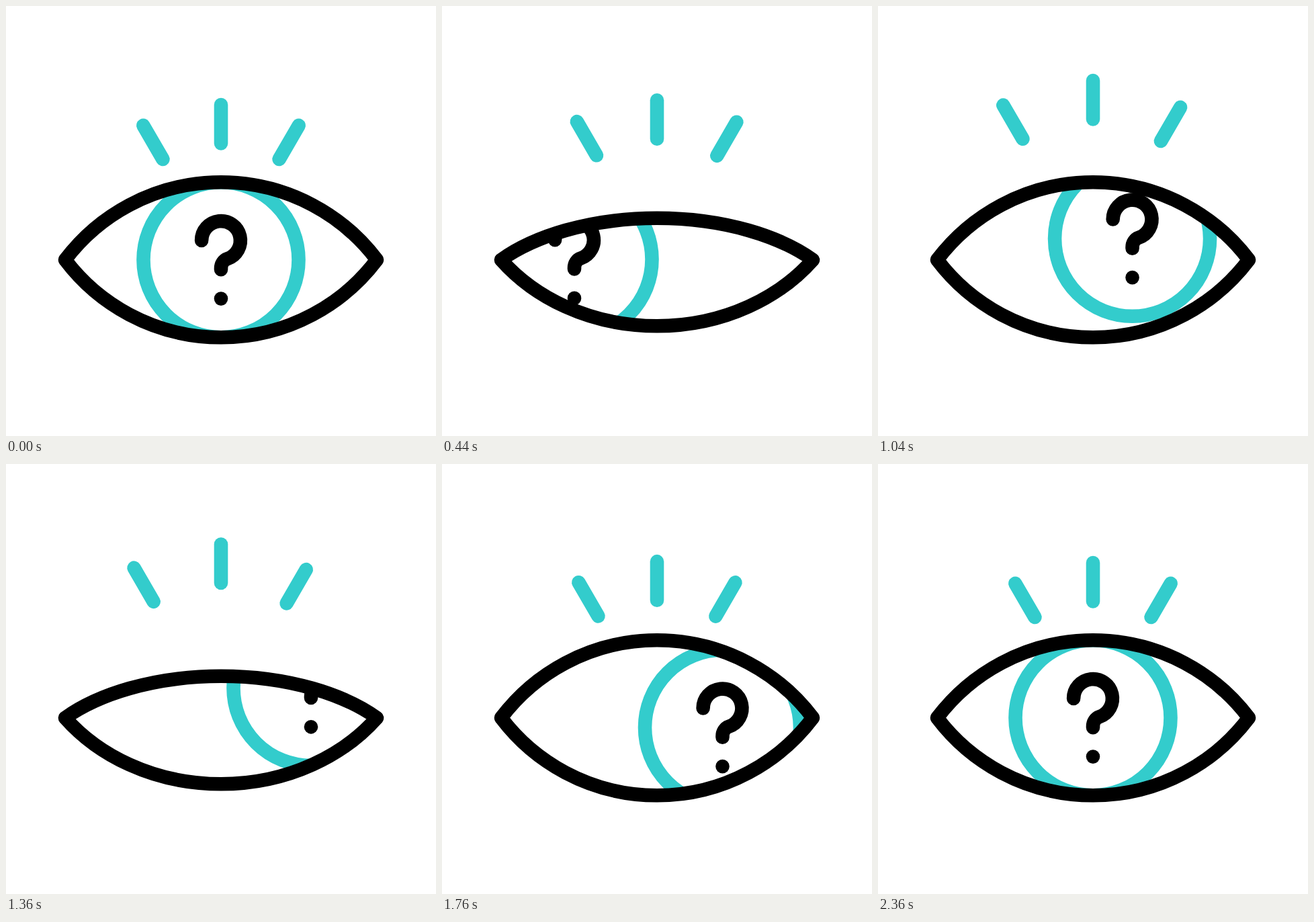
Animation, 640 px wide and 640 px high, one loop 2400 ms. Source, as an HTML page:

```html
<!DOCTYPE html>
<html lang="en">
<head>
<meta charset="utf-8">
<style>
  html, body { margin: 0; height: 100%; overflow: hidden; background: #fff; }
  svg { display: block; width: 100vw; height: 100vh; }
  path, circle { fill: none; stroke: #000; stroke-width: 20.6; stroke-linecap: round; stroke-linejoin: round; }
  .teal { stroke: #3cc; }
  .dot { fill: #000; stroke: none; }
</style>
</head>
<body>
<svg viewBox="0 0 640 640">
  <clipPath id="clip"><path id="opening"/></clipPath>
  <path class="teal" id="left" d="M204.3 177.8L233.4 228"/>
  <path class="teal" id="mid" d="M320 147V204.5"/>
  <path class="teal" id="right" d="M435.7 177.8L406.6 228"/>
  <g clip-path="url(#clip)">
    <g id="iris">
      <circle class="teal" cx="320" cy="377.8" r="115.5"/>
      <path d="M291.1 349A28.9 28.9 0 1 1 329.5 376.3C323.5 378.4 320 384.3 320 390.5V392.2"/>
      <circle class="dot" cx="320" cy="435.6" r="10.3"/>
    </g>
  </g>
  <path id="lids"/>
</svg>
<script>
const LOOP = 2400, STEP = 40;
const HALF = 232, RISE = 115.5;                       // half width and height of the open eye
const RADIUS = (HALF * HALF + RISE * RISE) / (2 * RISE);
const $ = id => document.getElementById(id);

// Eased 0 to 1 between two times.
function span(t, from, to) {
  const u = Math.min(1, Math.max(0, (t - from) / (to - from)));
  return u * u * (3 - 2 * u);
}

// Close for 120 ms, hold, open for 120 ms.
const blink = (t, at) => span(t, at, at + 120) - span(t, at + 360, at + 480);

const lidArc = (open, x) => `A${RADIUS} ${RADIUS * open} 0 0 1 ${x} 377.8`;

const move = (id, x, y) => $(id).setAttribute("transform", `translate(${x} ${y})`);

function draw(now) {
  const t = Math.floor(now % LOOP / STEP) * STEP;

  const shut = blink(t, 80) + blink(t, 1220);
  const d = `M88 377.8${lidArc(1 - 0.463 * shut, 552)}${lidArc(1 - 0.147 * shut, 88)}Z`;
  $("lids").setAttribute("d", d);
  $("opening").setAttribute("d", d);

  // The gaze goes left, across to the upper right, down, and home.
  const look = span(t, 80, 270), cross = span(t, 440, 1376);
  const drop = span(t, 1400, 1600), home = span(t, 1910, 2360);
  move("iris",
    -123 * look + 257.2 * cross - 36.7 * drop - 97.5 * home,
    -0.7 * look - 43.6 * cross + 58.8 * drop - 14.5 * home);

  const lift = 36 * (span(t, 240, 960) - span(t, 1130, 1860));
  move("left", -0.5 * lift, -0.84 * lift);
  move("mid", 0, -lift);
  move("right", 0.4 * lift, -0.75 * lift);
}

let start;
function tick(now) {
  start ??= now;
  draw(now - start);
  requestAnimationFrame(tick);
}
draw(0);
requestAnimationFrame(tick);
</script>
</body>
</html>
```
